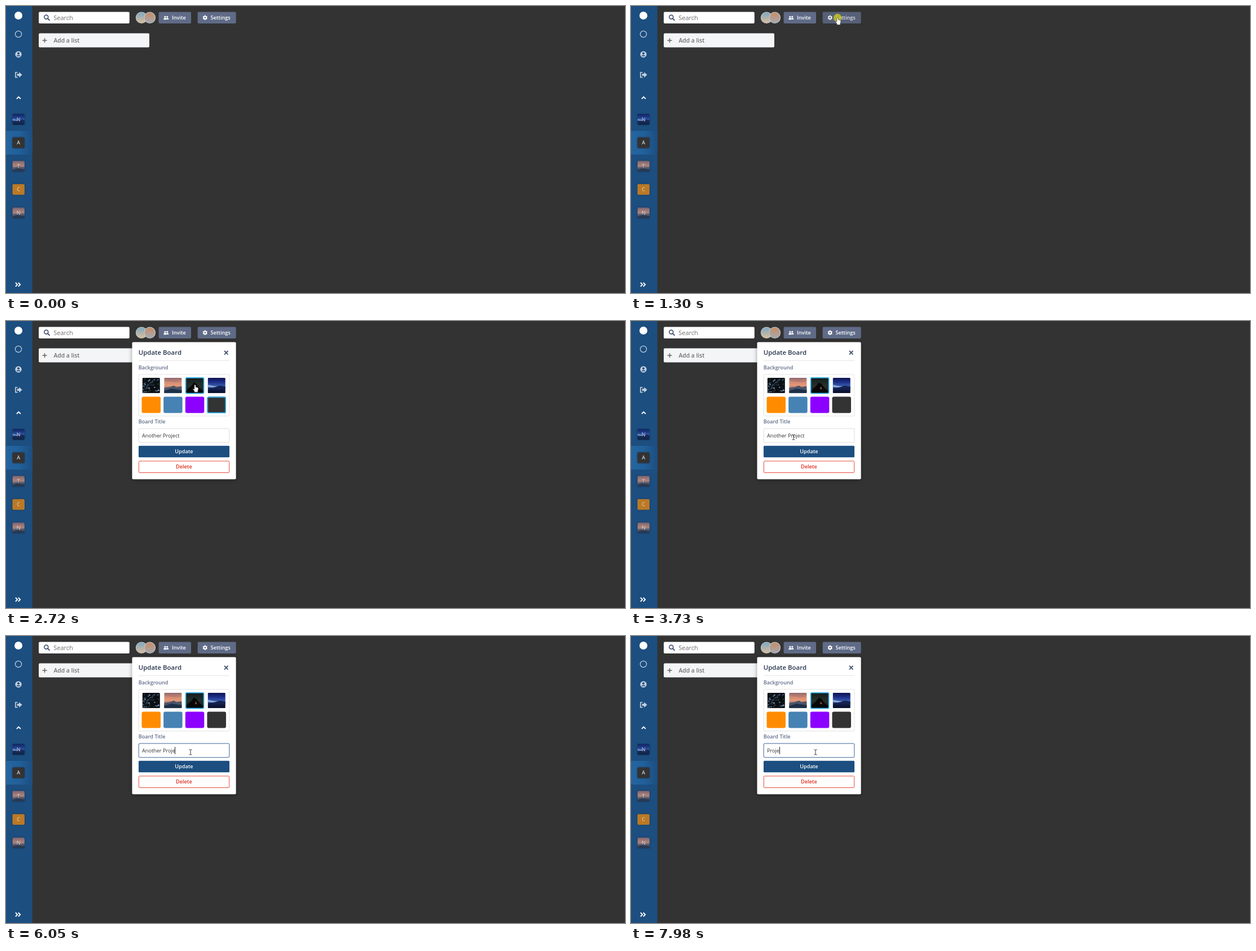
An HTML page with a canvas for the animation above (8000 ms loop, 1097 px wide and 510 px high).

```html
<!DOCTYPE html>
<html lang="en">
<head>
<meta charset="utf-8">
<title>Board settings</title>
<style>
  html, body { margin: 0; width: 100%; height: 100%; overflow: hidden; background: #333; }
  canvas { display: block; width: 1097px; height: 510px; }
</style>
</head>
<body>
<canvas id="stage"></canvas>
<script>
const W = 1097, H = 510, LOOP = 8000;
const FONT = '"Open Sans", "Noto Sans", sans-serif';
const BASE = 9.143;
const BLUE = '#1c4e80', SLATE = '#5f6b87', CYAN = '#32b2ea';
const TITLE = 'Another Project';

const canvas = document.getElementById('stage');
const dpr = window.devicePixelRatio || 1;
canvas.width = Math.round(W * dpr);
canvas.height = Math.round(H * dpr);
const c = canvas.getContext('2d');

// Timelines: [time, ...values], each held until the next
const POINTER = [
  [0, 0, 0, 'none'],
  [80, 1036, 499, 'arrow'], [160, 850, 395, 'arrow'], [240, 640, 277, 'arrow'], [320, 546, 224, 'arrow'],
  [650, 500, 187, 'arrow'], [730, 432, 128, 'arrow'], [810, 372, 76, 'arrow'], [890, 333, 48, 'arrow'],
  [980, 319, 38, 'arrow'], [1060, 346, 24, 'hand'], [1140, 366, 20, 'hand'],
  [2070, 365, 32, 'arrow'], [2150, 359, 56, 'arrow'], [2230, 351, 80, 'arrow'], [2310, 343, 98, 'arrow'],
  [2390, 338, 109, 'hand'], [2470, 336, 115, 'hand'], [2550, 335, 112, 'hand'], [2720, 335, 113, 'hand'],
  [3480, 309, 167, 'arrow'], [3560, 297, 191, 'ibeam'], [3640, 290, 203, 'ibeam'], [3730, 288, 206, 'ibeam'],
  [4230, 302, 206, 'ibeam'], [4310, 319, 206, 'ibeam'], [4390, 327, 206, 'ibeam']
];
const CLICKS = [[1300, 1390, 366, 21], [3050, 3130, 335, 114], [3900, 3970, 288, 206], [4560, 4640, 327, 206]];
const VALUE = [
  [0, TITLE], [5630, TITLE.slice(0, 14)],
  ...[13, 10, 7, 5, 2, 0].map((n, i) => [6050 + i * 86, TITLE.slice(0, n)]),
  ...[7230, 7480, 7650, 7900, 7980].map((t, i) => [t, 'Proje'.slice(0, i + 1)])
];
const CARET = [[0, false], [3900, true], [4390, false], [4560, true], [5050, false], [5550, true], [6480, false], [6650, true]];

const at = (list, t) => list.reduce((last, item) => item[0] <= t ? item : last);
const within = (t, from, to) => t >= from && t < to;

function random(seed) {
  return () => (seed = (seed * 16807) % 2147483647) / 2147483647;
}

function box(x, y, w, h, r, fill, line, lineWidth = 1) {
  c.beginPath();
  c.roundRect(x, y, w, h, r);
  if (fill) { c.fillStyle = fill; c.fill(); }
  if (line) { c.strokeStyle = line; c.lineWidth = lineWidth; c.stroke(); }
}

function disc(x, y, r, fill) {
  c.beginPath();
  c.arc(x, y, r, 0, Math.PI * 2);
  c.fillStyle = fill;
  c.fill();
}

function poly(points, fill) {
  c.beginPath();
  points.forEach(p => c.lineTo(...p));
  c.closePath();
  c.fillStyle = fill;
  c.fill();
}

function stroke(points, color, width, cap = 'butt') {
  c.beginPath();
  points.forEach(p => c.lineTo(...p));
  c.strokeStyle = color;
  c.lineWidth = width;
  c.lineCap = cap;
  c.stroke();
}

function text(str, x, y, color, size = BASE, weight = 400, align = 'left') {
  c.font = `${weight} ${size}px ${FONT}`;
  c.textAlign = align;
  c.fillStyle = color;
  c.fillText(str, x, y);
}

function fade(x0, y0, x1, y1, ...colors) {
  const g = c.createLinearGradient(x0, y0, x1, y1);
  colors.forEach((color, i) => g.addColorStop(i / (colors.length - 1), color));
  return g;
}

// Small landscapes in a unit square
const scenes = {
  blossom() {
    poly([[0, 0], [1, 0], [1, 1], [0, 1]], '#0b0f14');
    const rnd = random(29);
    for (let i = 0; i < 48; i++) {
      const color = ['#1f3a2c', '#4a6685', '#7d9cc0', '#25364a'][i % 4];
      disc(0.05 + rnd() * 0.9, 0.05 + rnd() * 0.9, 0.02 + rnd() * 0.035, color);
    }
  },
  sunset() {
    poly([[0, 0], [1, 0], [1, 1], [0, 1]], fade(0, 0, 0, 1, '#8a6670', '#d18a72', '#e59a78', '#6a5a6c', '#26384f'));
    poly([[0, 0.2], [0.5, 0.1], [1, 0.25], [0.6, 0.28]], '#a7737280');
    poly([[0, 0.66], [0.3, 0.6], [0.55, 0.5], [0.7, 0.6], [1, 0.55], [1, 1], [0, 1]], '#4c5468');
    poly([[0, 0.85], [0.4, 0.7], [1, 0.8], [1, 1], [0, 1]], '#1e3048');
  },
  camp() {
    poly([[0, 0], [1, 0], [1, 1], [0, 1]], fade(0, 0, 0, 1, '#141d1c', '#26302b', '#1a1d19'));
    poly([[0, 0.85], [0.28, 0.55], [0.45, 0.3], [0.6, 0.4], [0.8, 0.7], [1, 0.85], [1, 1], [0, 1]], '#070808');
    poly([[0.5, 0.72], [0.56, 0.55], [0.64, 0.74]], '#8a4a38');
  },
  night() {
    poly([[0, 0], [1, 0], [1, 1], [0, 1]], fade(0, 0, 0, 1, '#0d1450', '#1c2c86', '#3555a8', '#101c46', '#080e28'));
    poly([[0, 0.45], [0.35, 0.53], [0.75, 0.57], [0.4, 0.64], [0, 0.6]], '#86a6d8');
    poly([[0.4, 0.6], [0.7, 0.5], [1, 0.58], [1, 0.72], [0, 0.72]], '#14224f');
  }
};

function scene(name, x, y, w, h, r) {
  c.save();
  c.beginPath();
  c.roundRect(x, y, w, h, r);
  c.clip();
  c.translate(x, y);
  c.scale(w, h);
  scenes[name]();
  c.restore();
}

function chevron(x, y, dx, dy) {
  const side = dx ? [[-dx, -3.5], [0, 0], [-dx, 3.5]] : [[-3.5, -dy], [0, 0], [3.5, -dy]];
  stroke(side.map(p => [x + p[0], y + p[1]]), '#fff', 1.8);
}

function sidebar() {
  const icon = '#c4d0dd';
  box(0, 0, 46.7, H, 0, BLUE);
  box(0, 222, 46.7, 42, 0, fade(0, 0, 46.7, 0, '#25659f', '#22609a', BLUE));
  disc(22, 17, 7, '#fff');

  c.beginPath();
  c.arc(22, 50, 5.6, 0, Math.PI * 2);
  c.strokeStyle = icon;
  c.lineWidth = 1.2;
  c.stroke();

  disc(22, 86, 5.7, icon);
  disc(22, 84.3, 2, BLUE);
  c.beginPath();
  c.ellipse(22, 89.2, 3.3, 1.9, 0, Math.PI, Math.PI * 2);
  c.fill();

  stroke([[20.5, 118], [16.8, 118], [16.8, 126.6], [20.5, 126.6]], icon, 1.6);
  poly([[19.5, 120.5], [23.2, 120.5], [23.2, 117.4], [28.6, 122.3], [23.2, 127.2], [23.2, 124.1], [19.5, 124.1]], icon);

  chevron(22.4, 161.6, 0, -3.4);
  chevron(20.3, 495, 3.4, 0);
  chevron(25.2, 495, 3.4, 0);

  const boards = [['N', 'night'], ['A', '#333'], ['T', 'sunset'], ['C', '#ff8c00'], ['N', 'sunset']];
  boards.forEach(([letter, look], i) => {
    const y = 192 + i * 41.5;
    c.save();
    c.shadowColor = 'rgba(0,0,0,.4)';
    c.shadowBlur = 3 * dpr;
    box(11.4, y, 21.5, 19, 2, BLUE);
    c.restore();
    c.globalAlpha = i === 1 ? 1 : 0.7;
    if (scenes[look]) scene(look, 11.4, y, 21.5, 19, 2);
    else box(11.4, y, 21.5, 19, 2, look);
    text(letter, 22.1, y + 12.8, '#fff', BASE, 400, 'center');
    c.globalAlpha = 1;
  });
}

function person(x, y, s, color) {
  disc(x, y - 2 * s, 1.7 * s, color);
  box(x - 2.8 * s, y + 0.4 * s, 5.6 * s, 3.2 * s, [2 * s, 2 * s, 0.5, 0.5], color);
}

function gear(x, y) {
  for (let i = 0; i < 3; i++) {
    const a = Math.PI / 2 + i * Math.PI / 3, dx = Math.cos(a), dy = Math.sin(a);
    stroke([[x - dx * 4.2, y - dy * 4.2], [x - dx * 2.4, y - dy * 2.4]], '#fff', 2);
    stroke([[x + dx * 4.2, y + dy * 4.2], [x + dx * 2.4, y + dy * 2.4]], '#fff', 2);
  }
  c.beginPath();
  c.arc(x, y, 2.3, 0, Math.PI * 2);
  c.lineWidth = 1.9;
  c.stroke();
}

function header(t) {
  box(58, 10.4, 160.8, 20.7, 2, '#fff');
  c.beginPath();
  c.arc(71.3, 19.6, 3.5, 0, Math.PI * 2);
  c.strokeStyle = '#4a5875';
  c.lineWidth = 1.7;
  c.stroke();
  stroke([[74, 22.3], [77, 25.4]], '#4a5875', 2, 'round');
  text('Search', 84.3, 24.6, '#6f6f6f', 10.97);

  [[240.2, '#7fa9c0', '#d8bd9c'], [254.8, '#c58e68', '#a8a9b0']].forEach(([x, top, bottom]) => {
    disc(x, 20.8, 10.3, '#c3ccd2');
    disc(x, 20.8, 9.3, fade(0, 12, 0, 30, top, bottom));
  });

  box(270.6, 10.4, 57.4, 20.7, 2, SLATE);
  person(285.8, 21, 0.85, '#fff');
  person(281.9, 21, 1, SLATE);
  person(281.9, 21, 0.9, '#fff');
  text('Invite', 294, 24, '#fff', BASE, 600);

  c.globalAlpha = within(t, 1060, 2070) ? 0.82 : 1;
  box(339.6, 10.4, 68, 20.7, 2, SLATE);
  gear(352.8, 20.7);
  text('Settings', 362.5, 24, '#fff', BASE, 600);
  c.globalAlpha = 1;

  box(58, 48.4, 196, 25.2, 2, '#f4f5f7');
  stroke([[64.5, 61.2], [72.5, 61.2]], '#6b6b6b', 1.6);
  stroke([[68.5, 57.2], [68.5, 65.2]], '#6b6b6b', 1.6);
  text('Add a list', 84.5, 64.9, '#6f6f6f', 10.29, 600);
}

function swatches(t) {
  const looks = ['blossom', 'sunset', 'camp', 'night', '#ff8c00', '#4682b4', '#8c00ff', '#333333'];
  const selected = t < 3130 ? 7 : 2;
  const hovered = within(t, 2390, 3480) ? 2 : -1;
  looks.forEach((look, i) => {
    const x = 240.5 + (i % 4) * 38.65, y = i < 4 ? 100 : 134.6;
    const marked = i === selected || i === hovered;
    if (scenes[look]) scene(look, x + 1.1, y + 1.1, 31.3, 27.2, 1.5);
    else box(x, y, 33.5, 28.9, 3, look);
    if (marked) box(x + 0.8, y + 0.8, 31.9, 27.8, 2, null, CYAN, 1.7);
  });
}

function field(t) {
  const value = at(VALUE, t)[1], focused = t >= 3900;
  box(235.2, 191, 160.6, 24.8, 2, '#fff', focused ? '#3a639b' : '#dcdcdc');
  text(value || 'Board Name', 241, 206.6, value ? '#333' : '#858585');
  if (!at(CARET, t)[1]) return;
  const before = t < 4390 ? value.slice(0, 10) : value;
  c.fillStyle = '#222';
  c.fillRect(Math.floor(241.1 + c.measureText(before).width * (value ? 1 : 0)), 197, 1, 13);
}

function dialog(t) {
  c.save();
  c.shadowColor = 'rgba(0,0,0,.4)';
  c.shadowBlur = 7 * dpr;
  c.shadowOffsetY = dpr;
  box(223.5, 37.5, 184.1, 243.8, 2, '#fff');
  c.restore();
  text('Update Board', 234.7, 60.3, '#25324b', 11.43, 600);
  stroke([[387, 53], [393.4, 59.6]], '#4f5b76', 2);
  stroke([[393.4, 53], [387, 59.6]], '#4f5b76', 2);
  stroke([[235, 70.4], [396, 70.4]], '#dedede', 0.8);
  text('Background', 234.7, 85.6, SLATE, BASE, 600);
  box(235.3, 94.9, 160.4, 74, 2, null, '#dcdcdc', 0.8);
  swatches(t);
  text('Board Title', 234.7, 181.6, SLATE, BASE, 600);
  field(t);
  box(235, 221.8, 161, 20.4, 1.5, BLUE);
  text('Update', 315.4, 235.2, '#fff', BASE, 600, 'center');
  box(235.4, 248.9, 160.2, 20.6, 1.5, '#fff', '#e5392b', 0.9);
  text('Delete', 315.4, 262.3, '#df2b1c', BASE, 600, 'center');
}

const cursors = {
  none() {},
  arrow() {
    poly([[0, 0], [0, 9.4], [2.2, 7.5], [3.8, 11], [5.3, 10.3], [3.8, 6.9], [7, 6.8]], '#fff');
    c.strokeStyle = '#222';
    c.lineWidth = 0.6;
    c.stroke();
  },
  hand() {
    c.beginPath();
    c.moveTo(-1.2, 1.2);
    c.quadraticCurveTo(0, -0.8, 1.2, 1.2);
    c.lineTo(1.3, 4.4);
    c.lineTo(4.6, 5.2);
    c.quadraticCurveTo(6.1, 5.7, 6, 7.2);
    c.lineTo(5, 11);
    c.lineTo(5, 13.4);
    c.lineTo(-1, 13.4);
    c.lineTo(-1.2, 11.5);
    c.lineTo(-4, 8);
    c.quadraticCurveTo(-3.6, 6.4, -1.2, 8.2);
    c.closePath();
    c.fillStyle = '#fff';
    c.fill();
    c.strokeStyle = '#222';
    c.lineWidth = 0.6;
    c.stroke();
  },
  ibeam() {
    stroke([[0, -3.2], [0, 4.2]], '#333', 1);
    [[-4, -3.2], [5, 4.2]].forEach(([end, y]) => {
      stroke([[-2.7, end], [-1, end], [0, y], [1, end], [2.7, end]], '#333', 0.9);
    });
  }
};

function pointer(t) {
  const click = CLICKS.find(([from, to]) => within(t, from, to));
  if (click) disc(click[2], click[3], click[3] > 200 ? 6.3 : 7.2, 'rgba(190,190,38,.9)');
  const [, x, y, shape] = at(POINTER, t);
  c.save();
  c.translate(x, y);
  cursors[shape]();
  c.restore();
}

function draw() {
  const t = performance.now() % LOOP;
  c.setTransform(dpr, 0, 0, dpr, 0, 0);
  box(0, 0, W, H, 0, '#333');
  sidebar();
  header(t);
  if (t >= 1390) dialog(t);
  pointer(t);
  requestAnimationFrame(draw);
}
draw();
</script>
</body>
</html>
```
